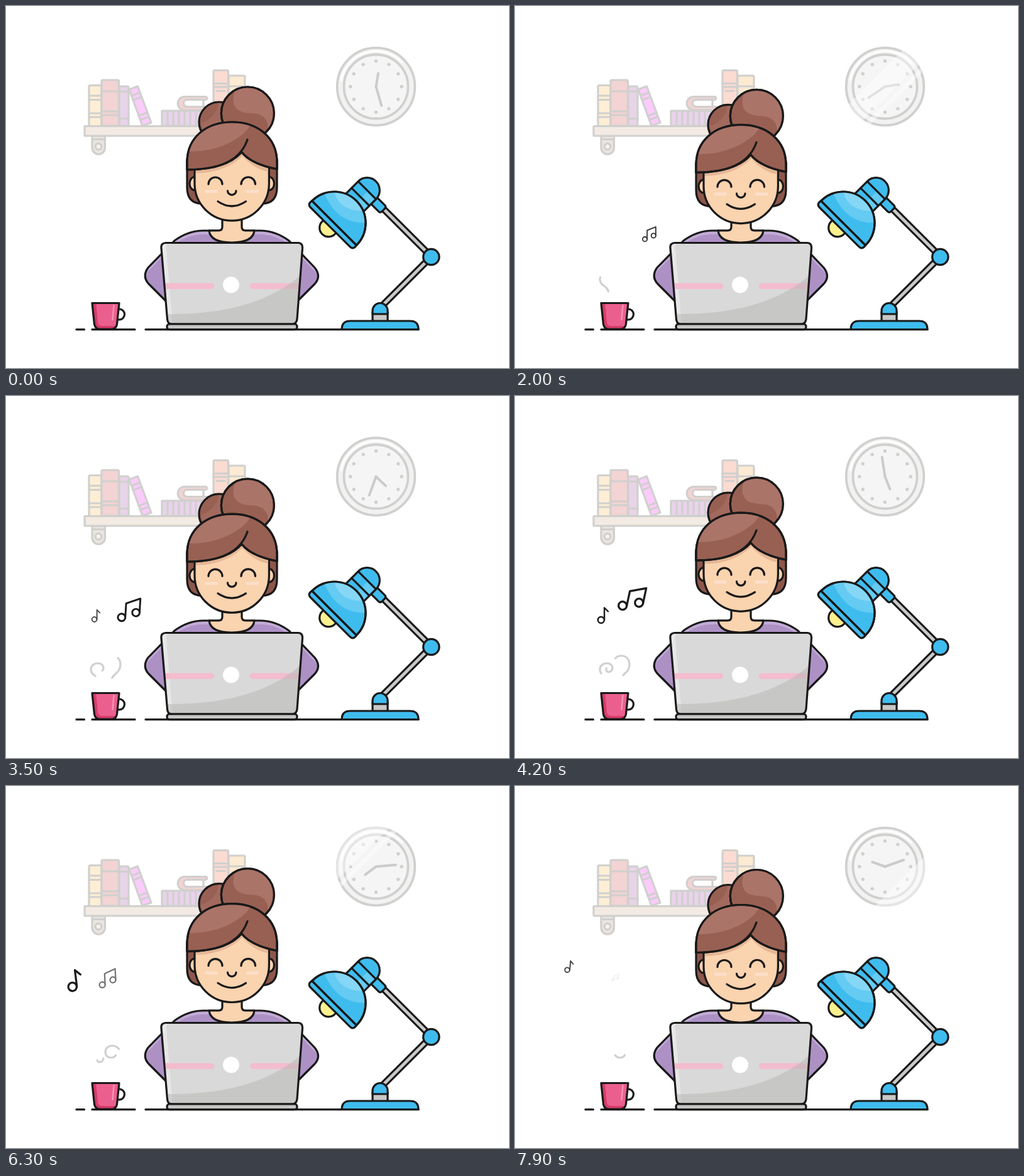
An HTML page that plays this animation: 800 px wide and 577 px high, repeating every 8000 ms.

```html
<!DOCTYPE html>
<html lang="en">
<head>
<meta charset="utf-8">
<title>Working at the desk</title>
<style>
  html, body { margin: 0; width: 100%; height: 100%; overflow: hidden; background: #fff; }
  svg { display: block; width: 100%; height: 100%; }
  .ink { stroke: #191919; stroke-width: 3.2; }
  .pale { stroke: #d0d0ce; stroke-width: 3.2; }
  .flat { stroke: none; }
</style>
</head>
<body>
<svg viewBox="0 0 800 577" fill="none" stroke-linecap="round" stroke-linejoin="round">
  <defs>
    <path id="torso" d="M254 470L227 443Q216 431 226 417L268 374Q290 358 314 358H404Q428 358 450 374L491 417Q502 431 491 443L464 470Z"/>
    <path id="lid" d="M254 377.500H465Q472 378 471.500 386L463 499Q462 507 455 507H264Q257 507 256.500 499L247 386Q246 378 254 377.500Z"/>
    <path id="cup" d="M137 473.500H180L176.500 507Q175 515 168 515H149Q142 515 140.500 507Z"/>
    <clipPath id="torsoClip"><use href="#torso"/></clipPath>
    <clipPath id="lidClip"><use href="#lid"/></clipPath>
    <clipPath id="cupClip"><use href="#cup"/></clipPath>
    <clipPath id="clockClip"><circle cx="588.500" cy="128.500" r="63.500"/></clipPath>
  </defs>

  <g id="shelf" class="pale">
    <path fill="#ebe5df" d="M137 207V226A10 10 0 0 0 157.500 226V207Z"/>
    <path d="M138 212.500H157"/>
    <circle cx="147" cy="224" r="4.800" fill="#f6f2ee"/>
    <rect x="125" y="191.500" width="265" height="15.500" rx="1" fill="#f2eae3"/>
    <rect x="132" y="126.500" width="20" height="65" rx="2" fill="#fdeed5"/>
    <path d="M132 143H152M132 149.500H152M132 171H152M132 177H152"/>
    <rect x="180" y="128" width="15" height="63" rx="2" fill="#e8d4e8"/>
    <path d="M180 136.500H195M180 179.500H195"/>
    <rect x="152" y="118" width="27.500" height="73" rx="2" fill="#f3d3d3"/>
    <path d="M152 136H179M152 168H179M152 174H179"/>
    <path fill="#fbcbfb" d="M196 133L209.500 128L231 186L217 191Z"/>
    <path d="M199.500 143L213 138M202 150L215.500 145M211 175L225 170M213.500 181.500L227.500 176.500"/>
    <rect x="248" y="167" width="80" height="24" fill="#ead3ec"/>
    <path d="M257 168V190M266 168V190M275 168V190M284 168V190M293 168V190M302 168V190"/>
    <path fill="#f3d3d3" d="M318 144.500H284A10.500 10.500 0 0 0 284 166H318Q321 166 320 160.500H288A5.500 5.500 0 0 1 288 149.500H318Q322 147 318 144.500Z"/>
    <path fill="#fff" d="M314 149.500H288A5.500 5.500 0 0 0 288 160.500H314Z"/>
    <rect x="354" y="111" width="26" height="80" rx="2" fill="#fdead2"/>
    <path d="M354 128H380"/>
    <rect x="330" y="102.500" width="23.500" height="89" rx="2" fill="#fbdbd2"/>
    <path d="M330 123.500H353M330 129H353M335 135.500H348"/>
  </g>

  <g id="clock" class="pale">
    <circle cx="588.500" cy="128.500" r="61.800" stroke-width="3.800" fill="#f2f2f2"/>
    <path d="M533 118A56.500 56.500 0 0 1 630 90" stroke="#fff" stroke-width="3"/>
    <circle cx="588.500" cy="128.500" r="51" stroke-width="3.800" fill="#f5f5f5"/>
    <g id="ticks" class="flat" fill="#d0d0ce"></g>
    <g stroke="#cbcbc9" stroke-width="4">
      <path id="minute" d="M588.500 128.500V97"/>
      <path id="hour" d="M588.500 128.500V107"/>
    </g>
    <g clip-path="url(#clockClip)">
      <g id="sheen" class="flat" fill="#fff" opacity=".45">
        <rect x="-18" y="-90" width="34" height="180"/>
        <rect x="22" y="-90" width="7" height="180"/>
      </g>
    </g>
  </g>

  <path class="ink" d="M112 515.700H124.500M137 515.700H205M222 515.700H656"/>

  <g id="lamp" class="ink" fill="#3fbcee">
    <g id="arms">
      <path d="M597 320L674 397M674 402L598 478" stroke-width="11"/>
      <path d="M597 320L674 397M674 402L598 478" stroke="#c9cac8" stroke-width="4.800"/>
    </g>
    <circle cx="676.300" cy="400" r="12.700"/>
    <rect x="583" y="488" width="24" height="15" fill="#c9cac8"/>
    <path d="M583 491V485.500A12 12 0 0 1 607 485.500V491Z"/>
    <path d="M534 515.500Q534 502 547 502H643Q656 502 656 515.500Z"/>
    <circle cx="513" cy="353.500" r="14.300" fill="#fdf08f"/>
    <g transform="translate(522 346) rotate(45)">
      <path d="M20 -77H37Q40.500 -77 40.500 -73V-67Q40.500 -63 37 -63H20Z"/>
      <path d="M-20 -45V-74A20 20 0 0 1 20 -74V-45Z"/>
      <path class="flat" fill="#65cbf2" d="M2 -57.500V-46H18V-57.500ZM2 -61V-72H18V-61Z"/>
      <path d="M-20 -59H20M-20 -74H20"/>
      <path d="M-50 0A50 50 0 0 1 50 0Z"/>
      <path class="flat" fill="#65cbf2" d="M-44 -22Q4 -3 34 -34.500A48.500 48.500 0 0 0 -44 -22Z"/>
      <path class="flat" fill="#86d7f6" d="M-34 -34.500Q-8 -20 18 -45A48.500 48.500 0 0 0 -34 -34.500Z"/>
      <path d="M-50 0H50Q52 9 44 9H-44Q-52 9 -50 0Z"/>
      <path d="M-50 0A50 50 0 0 1 50 0Z" fill="none"/>
    </g>
  </g>

  <g id="body">
    <use href="#torso" fill="#c2acd6"/>
    <g clip-path="url(#torsoClip)"><use href="#torso" y="6" fill="#ad91c5"/></g>
    <use href="#torso" class="ink"/>
    <path class="ink" fill="#fad3af" d="M323 358Q325 377 359 377T395 358"/>
    <path class="flat" fill="#fad3af" d="M344 310V352Q344 358 338 358V361H381V358Q375 358 375 352V310Z"/>
    <path class="ink" d="M344 330V352Q344 358 338 358H323M375 330V352Q375 358 381 358H395"/>
  </g>

  <g id="head" class="ink">
    <circle cx="339" cy="185" r="32" fill="#986053"/>
    <path class="flat" fill="#ab7468" d="M338 154.600Q335 178 310 187Q314 206 330 213L352 180V157Q345 154.600 338 154.600Z" opacity=".55"/>
    <circle cx="384.300" cy="171" r="42" fill="#986053"/>
    <path class="flat" fill="#ab7468" d="M364 135Q353 170 390 171Q416 171 417 195A40.500 40.500 0 0 0 364 135Z"/>
    <circle cx="384.300" cy="171" r="42"/>
    <path fill="#8d574b" d="M288 245V289Q288 315 312 315H407Q431 315 431 289V245Z"/>
    <ellipse cx="300" cy="283" rx="8" ry="10.500" fill="#fad3af"/>
    <ellipse cx="418.500" cy="283" rx="8" ry="10.500" fill="#fad3af"/>
    <path fill="#fad3af" d="M300 235V283A59.200 59.200 0 0 0 418.400 283V235Z"/>
    <path class="flat" fill="#e5b796" d="M302 258Q350 255 375 233Q395 253 417 258V264Q394 260 376 239Q348 266 302 266.500Z"/>
    <path fill="#986053" d="M288 261V249C288 210 318 185 359.500 185S431 210 431 249V260Q390 252 375 233Q350 261 288 261Z"/>
    <path class="flat" fill="#ab7468" d="M291 232Q340 232 373 207Q384 199 388 190.500Q374 186.500 359 186.600C320 187 295 207 291 232Z"/>
    <path d="M384 213Q368 261 288 261V249C288 210 318 185 359.500 185S431 210 431 249V260Q390 252 375 233"/>
    <path d="M322 284A11 11 0 0 1 344 284M374 284A11 11 0 0 1 396.500 284M352.500 294.500A6.700 6.500 0 0 0 366 294.500M337 311.500Q359 326.500 381.500 311.500"/>
    <path stroke="#fcdfca" stroke-width="5" stroke-linecap="butt" d="M316.500 295.500H336.500M382 295.500H402"/>
  </g>

  <g id="laptop">
    <use href="#lid" fill="#d9d9d9"/>
    <g clip-path="url(#lidClip)">
      <path fill="#e7e7e7" d="M246 377H258Q254 380 255 388L265 508H250Z"/>
      <path fill="#f3bccf" d="M240 441.800H326.500A4.700 4.700 0 0 1 326.500 451.200H240ZM480 441.800H392.500A4.700 4.700 0 0 0 392.500 451.200H480Z"/>
      <path fill="#b5b7b3" opacity=".5" d="M258 491Q400 492 472 426V508H258Z"/>
    </g>
    <use href="#lid" class="ink"/>
    <rect class="ink" x="256" y="507" width="207" height="8.700" rx="4" fill="#c6c7c5"/>
    <circle cx="358" cy="444.500" r="13" fill="#fff"/>
  </g>

  <g id="mug">
    <path class="ink" d="M179 483H180A8.500 8.500 0 0 1 180 500H177.500" fill="#fff"/>
    <use href="#cup" fill="#eb5f8e"/>
    <path clip-path="url(#cupClip)" fill="#d63c6a" d="M136 472H143L146 504Q147 510 153 510H178V517H136Z"/>
    <path stroke="#f492b2" stroke-width="2.600" d="M171.500 477L169.500 500"/>
    <use href="#cup" class="ink"/>
  </g>

  <g stroke="#d0d0d0" stroke-width="3.200">
    <path id="steamLeft" pathLength="74" d="M149 459C149 454 147 450 143 447C138 444 135 441 135 436C135 430 140 426 146 426C151 426 155 429 155 433.500C155 437 152 440 149 440C146 440 144 437 145.500 434"/>
    <path id="steamRight" pathLength="90" d="M168 455C167 450 170 447 173 444C179 439 182 435 182 428C182 420 177 414 169 414C162 414 158 418.500 158 424C158 429.500 162 433 167 433C171 433 174 431 175 428"/>
  </g>

  <g id="pair" class="ink">
    <circle cx="-12" cy="15" r="6.500"/><circle cx="12.600" cy="5" r="6.500"/>
    <path d="M-5.500 15V-10L19 -20V5"/>
  </g>
  <g id="single" class="ink">
    <circle cx="-5.500" cy="10" r="6.700"/>
    <path d="M1.500 10V-16L9.500 -8"/>
  </g>
</svg>

<script>
const LOOP = 8000, STEP = 100;
const $ = id => document.getElementById(id);

// Each key is [time, ...values].
const pairKeys = [
  [600, 224, 371, .1, 5, 0], [1200, 221.5, 368.5, .31, 5, .8], [2800, 205, 358, .81, -5, 1],
  [4200, 186, 322, 1, 12, 1], [5100, 171, 310, .9, -5, 1], [6300, 161, 306, .7, -3, .6],
  [7900, 159, 305, .27, 5, .1]
];
const singleKeys = [
  [2200, 148, 352, .2, 0, 0], [2800, 146.5, 351, .42, 0, .6], [4200, 141, 349.5, .75, 0, 1],
  [5100, 128.6, 344, .9, 11, 1], [6300, 110, 309.5, 1, -7, 1], [7900, 86.7, 287.8, .57, 5, .85]
];
const steamLeftKeys = [[550, 0, 0], [1200, 0, 14], [2800, 8, 48], [4200, 21, 74], [5100, 38, 74], [6300, 57, 71], [7300, 74, 74]];
const steamRightKeys = [[2000, 0, 0], [2800, 0, 22], [4200, 11, 61], [5100, 17, 90], [6300, 39, 89], [7900, 72, 89]];

function sample(keys, t) {
  const next = keys.findIndex(key => key[0] > t);
  if (next === 0) return keys[0].slice(1);
  if (next < 0) return keys.at(-1).slice(1);
  const a = keys[next - 1], b = keys[next], k = (t - a[0]) / (b[0] - a[0]);
  return a.slice(1).map((v, i) => v + (b[i + 1] - v) * k);
}

function placeNote(id, keys, t) {
  const [x, y, scale, angle, opacity] = sample(keys, t);
  $(id).setAttribute('transform', `translate(${x} ${y}) rotate(${angle}) scale(${scale})`);
  $(id).setAttribute('opacity', opacity);
}

function trim(id, keys, t) {
  const [from, to] = sample(keys, t), path = $(id);
  path.setAttribute('visibility', to - from > .1 ? 'visible' : 'hidden');
  path.setAttribute('stroke-dasharray', `${to - from} 999`);
  path.setAttribute('stroke-dashoffset', -from);
}

const turn = (id, angle) => $(id).setAttribute('transform', `rotate(${angle} 588.5 128.5)`);

function draw(t) {
  const bob = 2.4 * (1 - Math.cos(2 * Math.PI * t / 5000));
  $('head').setAttribute('transform', `translate(0 ${bob})`);
  turn('minute', 164 + .216 * t);
  turn('hour', 9.5 + .0355 * t);
  const slide = (t % 5000 - 2050) * .06;
  $('sheen').setAttribute('transform', `translate(588.5 128.5) rotate(45) translate(${slide} 0)`);
  trim('steamLeft', steamLeftKeys, t);
  trim('steamRight', steamRightKeys, t);
  placeNote('pair', pairKeys, t);
  placeNote('single', singleKeys, t);
}

$('ticks').innerHTML = Array.from({ length: 12 }, (_, i) =>
  `<circle cx="588.5" cy="87.8" r="2.7" transform="rotate(${i * 30} 588.5 128.5)"/>`).join('');

const start = performance.now();
function tick() {
  const t = (performance.now() - start) % LOOP;
  draw(Math.floor(t / STEP) * STEP);
  requestAnimationFrame(tick);
}
tick();
</script>
</body>
</html>
```
